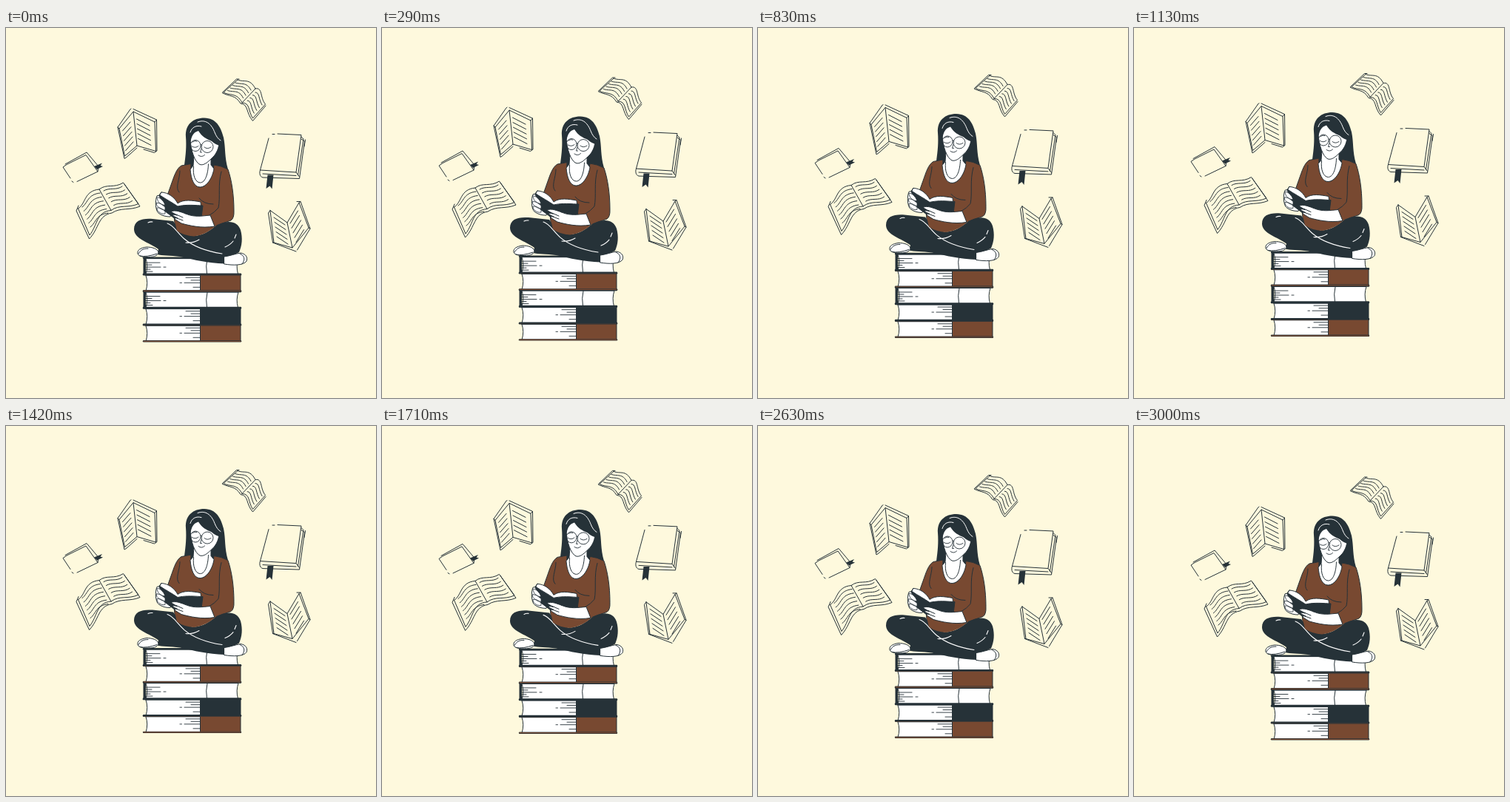
Recreate the animation shown at these times as an HTML page with a canvas. Size 500 by 500 pixels, loop 3040 ms.

```html
<!DOCTYPE html>
<html lang="en">
<head>
<meta charset="utf-8">
<title>Reading</title>
<style>
html, body { margin: 0; width: 100%; height: 100%; overflow: hidden; background: #fef9dd; }
canvas { display: block; width: 500px; height: 500px; }
</style>
</head>
<body>
<canvas id="stage"></canvas>
<script>
const PAPER = '#fef9dd', INK = '#263238', BROWN = '#784931', WHITE = '#fff';
const LOOP = 3040, FLOAT = 3000, RISE = 10, FPS = 24;

const canvas = document.getElementById('stage');
const ctx = canvas.getContext('2d');
const scale = window.devicePixelRatio || 1;
canvas.width = canvas.height = 500 * scale;
ctx.lineCap = ctx.lineJoin = 'round';

function shape(d, fill, stroke, width = 1) {
  const path = new Path2D(d);
  if (fill) { ctx.fillStyle = fill; ctx.fill(path); }
  if (stroke) { ctx.strokeStyle = stroke; ctx.lineWidth = width; ctx.stroke(path); }
}
const line = (d, color = INK, width = 1) => shape(d, null, color, width);
function rect(x, y, w, h, color) {
  ctx.fillStyle = color;
  ctx.fillRect(x, y, w, h);
}

// Repeats one stroke n times, each moved on by (dx, dy).
function repeat(d, n, dx, dy, width = 1) {
  ctx.save();
  for (let i = 0; i < n; i++) {
    line(d, INK, width);
    ctx.translate(dx, dy);
  }
  ctx.restore();
}

function openBookTop() {
  line('M313 70C322 74 329 67 337 82C347 80 343 94 350.5 103L333.500 122C327 112 330 101 319 101C312 87 303 92 294 87L313 70');
  line('M337 82L319 101M315 69H311.500L292 87.500C302 93 310 90 317 102C328 103 324 115 333.500 125.500L351 105');
  repeat('M310 74C318 77 325 72 331 84', 4, -3.5, 3.5);
  repeat('M337 87C343 87 341 96 346 104', 4, -3.6, 3.7);
}

function standingBookLeft() {
  line('M172 113L153 136L160.500 173L177 159L172 113L201 127L202.500 166.500L177 159');
  line('M167.500 110.500L151 134L153 136M151 134L160 176.500L163 174.500L177 162M167.500 110.500L169 109M172 109.500L203.500 124L201 127M203.500 124L204 166L200.500 168.500L186 164');
  repeat('M157.500 139L168 127', 5, 1, 6.7);
  repeat('M176.500 123L194 132', 5, .5, 6.6);
}

function smallBook() {
  line('M80 184L109 168L125 187');
  line('M87 203L77 188L82 184.500L108 171.500L124 194L96 207.500M89 207L91 208.500M125 187L124 194');
  shape('M119 187L130 182.500L127.500 186L131 187L123 191Z', INK);
}

function openBookLeft() {
  line('M97.500 244C108 238 105 220 126 218C136 210 146 217 158.500 209L179 237.500C165 244 153 238 142 246.500C122 248 124 266 113 280L97.500 244');
  line('M126 218L142 246.500M98 240L95 247L112.500 285C126 271 124 253 143 250C155 242 167 247 181 241L160 211');
  repeat('M103 242C111 236 110 225 127 223', 6, 2.2, 5.4);
  repeat('M132 220C140 215 149 220 157 214', 5, 3.400, 4.9);
}

function closedBook() {
  line('M360 143.500H363M367 143L399 144.500L392 195L343.500 192L355 149');
  line('M399 150L403.500 153L396.500 203.500L347 202C343 201 342 196 343.500 192M404.500 151L403 160M347 197L392 199.500M392 195L396.500 201M399 147L402 150L394.500 199');
  shape('M353.500 198.500H361.500L359.500 217.500L356.500 213.500L351.500 217Z', INK);
}

function standingBookRight() {
  line('M357 246.500L380 263L387 297L362 290L357 246.500M380 263L396 236L409 270L387 297');
  line('M357 246.500L354.500 250L360.500 290L392 302M360.500 290L362 290M393 234.500H398L411 271L393.500 300M396 236L398 234.500M409 270L411 271');
  repeat('M362 256L377 266', 5, 1, 6.500);
  repeat('M384 264L394.500 247', 5, 2, 6.400);
}

function lyingBook(y, block, cover) {
  const pages = block
    ? `M189 ${y + 1}H264V${y + 22}H189`
    : `M189 ${y + 1}H314Q310.500 ${y + 11} 313.500 ${y + 22}H189`;
  shape(`${pages}Q192.500 ${y + 11} 189 ${y + 1}Z`, WHITE, INK);
  if (block) {
    rect(262.5, y + .5, 54.5, 21.5, block);
    line(`M262.500 ${y + 1}V${y + 22}M317 ${y + 1}V${y + 22}`);
    line(`M243 ${y + 4}H262M250 ${y + 7.500}H262M235 ${y + 11}H237.500M241 ${y + 11}H262M253 ${y + 17}H262`, INK, .9);
  } else {
    rect(185.5, y, 3.5, 23, INK);
    line(`M272 ${y + 1}Q269.500 ${y + 11} 271.500 ${y + 22}`);
    line(`M189 ${y + 6.500}H208M189 ${y + 9.500}H197M189 ${y + 12.500}H209M213 ${y + 12.500}H216M189 ${y + 15.500}H195M189 ${y + 18.500}H198`, INK, .9);
  }
  for (const edge of [y, y + 22]) {
    line(`M186 ${edge}H317`, INK, 2.400);
    if (cover !== INK) line(`M186 ${edge}H317`, cover, 1.2);
  }
}

function stack() {
  lyingBook(401.3, BROWN, BROWN);
  lyingBook(378.600, INK, INK);
  lyingBook(356, null, INK);
  lyingBook(333.300, BROWN, BROWN);
  lyingBook(310.600, null, INK);
}

function hairBack() {
  shape('M243 147C242 130 253 121.500 268 121.500C284 122 290 133 294 148C297 162 295 174 300 191L284 195L250 190L241 185C243 171 244 160 243 147Z', INK);
}

function head() {
  shape('M254 172L253 186L249 191C250 204 254 215 262 215C271 215 279 203 281 190L277 185V174Z', WHITE, INK);
  line('M253.500 187C252 199 256 209 262.500 209C269 209 273 198 273.500 184');
  shape('M249 151C249 142 253 137 259 136L273 146L288 156C287 165 283 172 277 177C272 182 267 186 262 184.500C255 181 250 166 249 151Z', WHITE, INK);
  // Fringe sweeping to the right.
  shape('M247 150C246 138 252 130 262 129C274 126 287 136 292 149L294.500 157.500C289 160 283 158 278 153C271 150 265 147 260 139C253 141 251 146 249.500 153Z', INK);
  line('M249 141C251 134 257 131 264 133M259 127C272 122 279 133 282 141Q285 149 290 152', WHITE);
  shape('M249 159a7 7.500 0 1 0 14 0a7 7.500 0 1 0 -14 0M264 160.500a8 8 0 1 0 16 0a8 8 0 1 0 -16 0', null, INK, .9);
  line('M263 158Q264 156.500 265 158M251.500 160Q256 163 260 159.500M268 161Q272 164.500 277 161M264 163L262.500 168H264.500M260 172Q264.500 175.500 268.500 171.500M252 154Q255 151.500 258 153', INK, .9);
}

function sweater() {
  shape('M250 183.500L237 186C230 190 227 201 223 212L217 229L226 244L228 264L232 276Q255 286 281 268L304 260Q308.500 257 308 247C308 225 305 206 300 191Q291 186 281 185C279 202 272 215 262 215C254 214 249 201 250 183.500Z', BROWN, INK);
  line('M235 193C235 204 228 216 234 222M291 194C286 212 290 228 287 243Q282 249 275 253M261 230Q267 238 280 238');
}

function legs() {
  shape('M173 272C173 260 184 257 198 258L226 261C232 270 238 278 252 281C266 281 275 274 284 267C298 259 313 260 317 273C320 284 319 294 315 303C307 307 300 311 295 318.500C273 318 254 313 235 309C222 307 211 308 204 306L206 299C194 290 173 285 173 272Z', INK);
  line('M218 264C226 266 231 276 241 285C254 296 273 302 292 305M243 290Q253 291 261 286M192 263Q195 261.500 198 262M311 279L309 284M307 288Q303 293 296 296', WHITE, 1.1);
  // Sweater hem over the lap.
  shape('M228 261L231 274Q241 281 254 281.500Q270 280 285 266Z', BROWN);
}

function feet() {
  shape('M206 303C205 298 197 296 190 296C182 297 177 300 178 305C180 310 190 310 199 309C203 308 206 306 206 303Z', WHITE, INK);
  line('M179 305C182 300 185 298 192 298M181 308Q190 310 204 305');
  shape('M295 309C303 308 310 305 317 304C324 305 327 310 325 315C321 321 307 321 295 319Z', WHITE, INK);
  line('M316 305C322 307 324 313 319 319');
}

function heldBook() {
  shape('M204 227C201 233 202 247 206 250C211 254 217 255 222 255L226 243L211 226Z', WHITE, INK);
  shape('M210 222L207 226L214 247L230 259L264 256L266 240L232 238Z', INK, INK);
  shape('M210 222C219 222 228 229 232 237C240 231 252 233 263 235L263.500 240C250 239 240 239 232 241C225 236 217 232 208 226Z', WHITE, INK);
  shape('M204 229Q208 228 213 235L215 239Q211 240 206 235ZM204 236Q209 236 215 242V246Q209 246 204 240ZM204 243Q210 242 215 248V251Q209 252 205 247Z', WHITE, INK, .8);
  shape('M223 248C229 245 237 249 243 251C254 256 265 254 276 253L282 268C264 271 248 267 237 264L229 259Q226 256 232 257L226 254Q224 251 231 253Z', WHITE, INK);
  line('M230 252L239 256M231 257L239 260M235 248Q240 248 243 251');
}

function scene() {
  openBookTop();
  standingBookLeft();
  smallBook();
  openBookLeft();
  closedBook();
  standingBookRight();
  stack();
  hairBack();
  sweater();
  head();
  legs();
  heldBook();
  feet();
}

function lift(ms) {
  const step = Math.floor(ms * FPS / 1000 + .1);
  const phase = (step * 1000 / FPS / FLOAT) % 1;
  return -RISE * (1 - Math.abs(1 - 2 * phase));
}

const start = performance.now();
function draw(now) {
  const ms = Math.max(0, now - start) % LOOP;
  ctx.setTransform(scale, 0, 0, scale, 0, 0);
  rect(0, 0, 500, 500, PAPER);
  ctx.translate(0, lift(ms));
  scene();
  requestAnimationFrame(draw);
}
draw(start);
</script>
</body>
</html>
```
